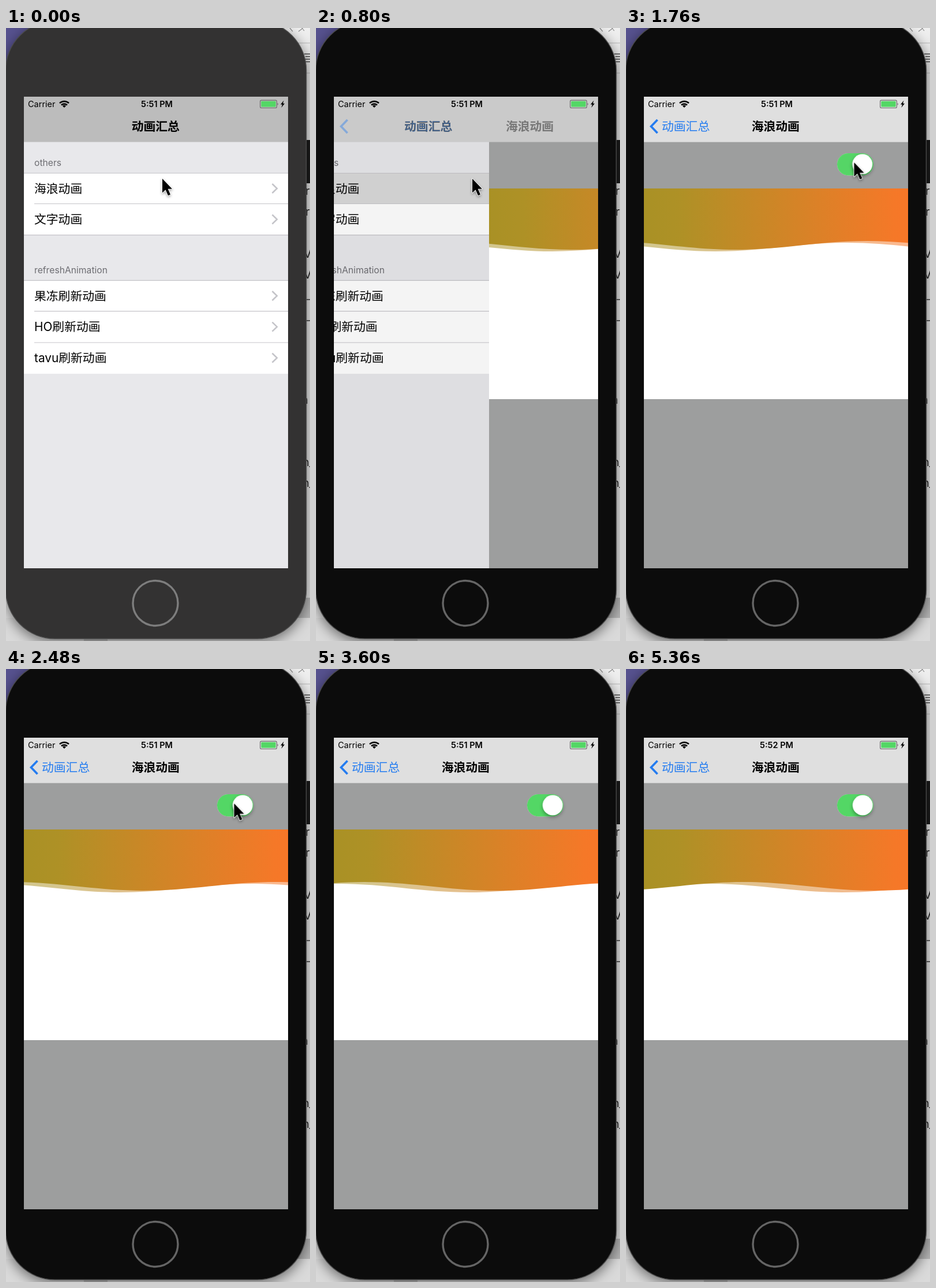
An HTML page for the animation above (5440 ms loop, 527 px wide and 1062 px high).

```html
<!DOCTYPE html>
<html lang="zh-CN">
<head>
<meta charset="utf-8">
<title>海浪动画</title>
<style>
html, body { margin: 0; width: 100%; height: 100%; overflow: hidden; background: #dedede; }
svg { display: block; width: 527px; height: 1062px; }
text { font-family: Inter, "Noto Sans CJK SC", "Noto Sans CJK", sans-serif; }
.row { font-size: 20.8px; }
.head { font-size: 15.7px; fill: #6d6d72; }
.bar { font-size: 20.8px; font-weight: 600; }
.back { font-size: 20.8px; fill: #247cf0; }
.status { font-size: 14.5px; }
.clock { font-weight: 600; text-anchor: middle; }
.line { stroke: #c5c4c9; stroke-width: 1.2; }
.chev { fill: none; stroke: #c4c4c9; stroke-width: 2.5; }
.side { font-size: 20px; fill: #222; }

/* one shared timeline; percentages are ms / 54.4 */
.a { animation: 5440ms linear infinite; --push: cubic-bezier(.2, .7, .2, 1); }
.step { animation-timing-function: step-end; }

#body { animation-name: body; }
#ring { animation-name: ring; }
#hit { animation-name: hit; }
#list { animation-name: list; }
#dim, #navTint, #navBack { animation-name: appear; }
#page { animation-name: page; }
#oldTitle { animation-name: oldTitle; }
#backTitle { animation-name: backTitle; }
#newTitle { animation-name: newTitle; }
#on { animation-name: on; }
#thumb { animation-name: thumb; }
#waveA { animation-name: waveA; }
#waveB { animation-name: waveB; }
#early { animation-name: early; }
#late { animation-name: late; }
#cursor { animation-name: cursor; }

@keyframes body { 0% { fill: #333232; } 11.7%, 100% { fill: #0c0c0c; } }
@keyframes ring { 0% { stroke: #7d7d7d; } 11.7%, 100% { stroke: #656565; } }
@keyframes hit { 0% { opacity: 0; } 12.6%, 100% { opacity: 1; } }
@keyframes list {
  0% { transform: none; }
  12.68% { transform: none; animation-timing-function: var(--push); }
  20.77%, 100% { transform: translateX(-137.4px); }
}
@keyframes page {
  0% { transform: translateX(459px); }
  12.68% { transform: translateX(459px); animation-timing-function: var(--push); }
  20.77%, 100% { transform: none; }
}
@keyframes appear {
  0% { opacity: 0; }
  12.68% { opacity: 0; animation-timing-function: var(--push); }
  20.77%, 100% { opacity: 1; }
}
@keyframes oldTitle {
  0% { transform: none; opacity: 1; }
  12.68% { transform: none; opacity: 1; animation-timing-function: var(--push); }
  20.77%, 100% { transform: translateX(-156px); opacity: 0; }
}
@keyframes backTitle {
  0% { transform: translateX(156px); opacity: 0; }
  12.68% { transform: translateX(156px); opacity: 0; animation-timing-function: var(--push); }
  20.77%, 100% { transform: none; opacity: 1; }
}
@keyframes newTitle {
  0% { transform: translateX(190px); opacity: 0; }
  12.68% { transform: translateX(190px); opacity: 0; animation-timing-function: var(--push); }
  20.77%, 100% { transform: none; opacity: 1; }
}
@keyframes on {
  0%, 28.3% { opacity: 0; }
  32.5%, 100% { opacity: 1; }
}
@keyframes thumb {
  0% { transform: none; }
  28.3% { transform: none; animation-timing-function: ease-out; }
  32.9%, 100% { transform: translateX(25.3px); }
}
@keyframes waveA {
  0%, 28.3% { transform: translateX(-55px); }
  100% { transform: translateX(208px); }
}
@keyframes waveB {
  0%, 28.3% { transform: translateX(-88px); }
  100% { transform: translateX(150px); }
}
@keyframes early { 0% { opacity: 1; } 72.8%, 100% { opacity: 0; } }
@keyframes late { 0% { opacity: 0; } 72.8%, 100% { opacity: 1; } }
@keyframes cursor {
  0%, 18% { transform: translate(271px, 261px); }
  19.1% { transform: translate(276px, 260px); animation-timing-function: ease-in-out; }
  27.5%, 53% { transform: translate(395.5px, 233px); animation-timing-function: ease-in; }
  60.5%, 100% { transform: translate(545px, 290px); }
}
</style>
</head>
<body>
<svg viewBox="0 0 527 1062">
  <defs>
    <linearGradient id="sea" gradientUnits="userSpaceOnUse" x1="31" x2="489" y1="0" y2="0">
      <stop offset="0" stop-color="#a99125"/>
      <stop offset=".13" stop-color="#ae9126"/>
      <stop offset=".95" stop-color="#f57828"/>
      <stop offset="1" stop-color="#f77728"/>
    </linearGradient>
    <linearGradient id="desk" x1="0" x2="0" y1="0" y2="1">
      <stop offset="0" stop-color="#f0f0f0"/>
      <stop offset=".07" stop-color="#e2e2e2"/>
      <stop offset="1" stop-color="#e2e2e2"/>
    </linearGradient>
    <clipPath id="screen"><rect x="31" y="119" width="458" height="816.5"/></clipPath>
    <clipPath id="content"><rect x="31" y="197.5" width="458" height="738"/></clipPath>
    <!-- sine of period 458, crest at x = 0 -->
    <path id="sine" d="M-458 270V369C-374.6 369-312.4 384-229 384S-83.4 369 0 369 145.6 384 229 384 374.6 369 458 369 603.6 384 687 384 832.6 369 916 369V270Z"/>
    <mask id="water" maskUnits="userSpaceOnUse" x="31" y="278" width="458" height="115">
      <g id="waveB" class="a"><use href="#sine" y="3" fill="#fff" opacity=".52"/></g>
      <g id="waveA" class="a"><use href="#sine" fill="#fff"/></g>
    </mask>
    <path id="chev" class="chev" d="M461.5 270l8.3 8-8.3 8"/>
  </defs>

  <!-- desktop behind the phone -->
  <rect width="527" height="1062" fill="url(#desk)"/>
  <path d="M0 0H60V60H0Z" fill="#57528f"/>
  <path d="M492 0l5 6M507 6l8-6M513 0l4 5" stroke="#888" stroke-width="1.2"/>
  <path d="M480 26H527M500 78H527" stroke="#b4b4b4"/>
  <path d="M517 45H527M519 49.500H527M517 54H527M519 58.500H527" stroke="#444" stroke-width="1.4"/>
  <rect x="512" y="194" width="30" height="75" rx="5" fill="#1b1b1b"/>
  <path d="M515 470.500H527M515 507H527" stroke="#333" stroke-width="1.5"/>
  <g class="side">
    <text x="519" y="289">r</text><text x="519" y="325">r</text>
    <text x="516" y="398">V</text><text x="516" y="434">V</text>
    <text x="512" y="651">n</text>
    <text x="514" y="759">n_</text><text x="514" y="795">n_</text>
  </g>
  <rect x="500" y="987" width="27" height="35" fill="#b4b4b4"/>
  <rect y="1022" width="527" height="40" fill="#dadada"/>
  <path d="M135 1057H176V1062H135Z" fill="#bdbdbd"/>

  <!-- phone -->
  <g style="filter:drop-shadow(0 6px 11px rgba(0,0,0,.5))">
    <rect id="body" class="a step" x="-.5" y="-12" width="521" height="1070" rx="85" stroke="#4b4b4b" stroke-width="1.4"/>
  </g>
  <circle id="ring" class="a step" cx="259" cy="996.500" r="39" fill="none" stroke-width="3.4"/>

  <g clip-path="url(#content)">
    <g id="list" class="a">
      <rect x="31" y="197" width="600" height="739" fill="#e8e8eb"/>
      <path d="M31 252H489V358.500H31ZM31 437.500H489V599H31Z" fill="#fff"/>
      <rect id="hit" class="a step" x="31" y="252" width="458" height="53" fill="#d9d9d9"/>
      <path class="line" d="M31 251.500H489M49 304.500H489M31 358.700H489M31 437.300H489M49 490.700H489M49 545H489"/>
      <text class="head" x="49" y="239">others</text>
      <text class="head" x="49" y="425">refreshAnimation</text>
      <g class="row">
        <text x="49" y="285.500">海浪动画</text>
        <text x="49" y="339.300">文字动画</text>
        <text x="49" y="471.500">果冻刷新动画</text>
        <text x="49" y="525.300">HO刷新动画</text>
        <text x="49" y="579.300">tavu刷新动画</text>
      </g>
      <use href="#chev"/>
      <use href="#chev" y="53.500"/>
      <use href="#chev" y="186"/>
      <use href="#chev" y="239.700"/>
      <use href="#chev" y="293.500"/>
    </g>
    <rect id="dim" class="a" x="31" y="197" width="458" height="739" fill="#000" fill-opacity=".1"/>

    <g id="page" class="a">
      <rect x="31" y="197" width="458" height="739" fill="#9d9e9e"/>
      <rect x="31" y="278" width="458" height="365" fill="#fff"/>
      <rect x="31" y="278" width="458" height="115" fill="url(#sea)" mask="url(#water)"/>
      <rect x="367" y="218" width="61" height="36.500" rx="18.250" fill="none" stroke="#e3e3e3" stroke-width="1.900"/>
      <rect id="on" class="a" x="366" y="217" width="63" height="38.500" rx="19.250" fill="#53d765"/>
      <g id="thumb" class="a">
        <circle cx="385" cy="236" r="17.500" fill="#fff" style="filter:drop-shadow(0 3px 3px rgba(0,0,0,.35))"/>
      </g>
    </g>
  </g>

  <!-- navigation and status bar -->
  <g clip-path="url(#screen)">
    <rect x="31" y="119" width="458" height="78.500" fill="#bcbcbc"/>
    <rect id="navTint" class="a" x="31" y="119" width="458" height="78.500" fill="#dfdfdf"/>
    <text id="oldTitle" class="bar a" x="217.700" y="178.300">动画汇总</text>
    <text id="newTitle" class="bar a" x="217.700" y="178.300">海浪动画</text>
    <path id="navBack" class="a" d="M54.500 159L43.500 170.500L54.500 182" fill="none" stroke="#247cf0" stroke-width="3.700"/>
    <text id="backTitle" class="back a" x="62" y="178.300">动画汇总</text>

    <g class="status">
      <text x="38" y="137">Carrier</text>
      <text id="early" class="clock a step" x="261.500" y="137">5:51 PM</text>
      <text id="late" class="clock a step" x="261" y="137">5:52 PM</text>
    </g>
    <g fill="none" stroke="#000" stroke-width="2.500">
      <path d="M93 130.200a11.500 11.500 0 0 1 16 0M96 133.500a7.200 7.200 0 0 1 10 0"/>
    </g>
    <path d="M101 138l-3-3a4.300 4.300 0 0 1 6 0Z"/>
    <rect x="440.600" y="125.100" width="28.800" height="13.400" rx="2.300" fill="none" stroke="#6b6b6b" stroke-width="1.100"/>
    <rect x="442.300" y="126.800" width="25.400" height="10" rx="1" fill="#53d765"/>
    <path d="M470.700 129.500q2 2.300 0 4.600Z" fill="#555"/>
    <path d="M481.500 125.500L476 132.500H479L477.300 138L483 130.800H480Z"/>
  </g>

  <g id="cursor" class="a">
    <path d="M0 0V24.500L5.600 19.300L10 29.300L14 27.500L9.700 17.700H17Z" stroke="#fff" stroke-width="1.800" stroke-linejoin="round" paint-order="stroke" style="filter:drop-shadow(0 2px 2px rgba(0,0,0,.35))"/>
  </g>
</svg>
</body>
</html>
```
